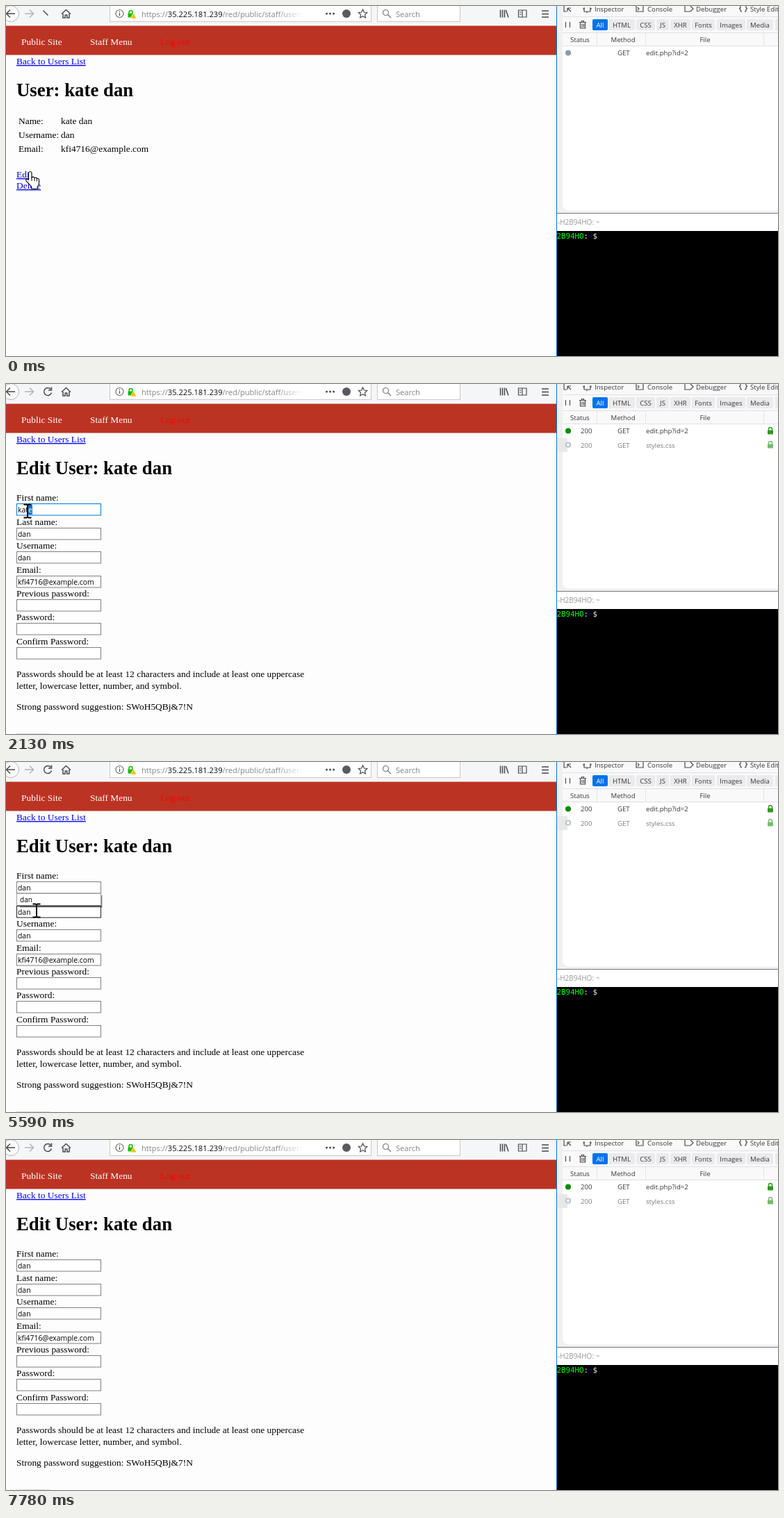
These frames come from a looping animation (1111x504 px, 8 s). An HTML page:

```html
<!DOCTYPE html>
<html lang="en">
<head>
<meta charset="utf-8">
<title>Edit user</title>
<style>
html, body { margin: 0; width: 100%; height: 100%; overflow: hidden; background: #fdfdfd; }
svg { display: block; width: 1111px; height: 504px; }
text { white-space: pre; }
.page { font: 13.44px "Liberation Serif", serif; }
.h1 { font: bold 26.8px "Liberation Serif", serif; }
.link { font: 13.44px "Liberation Serif", serif; fill: #0000ee; text-decoration: underline; }
.ui { font: 10.4px "Open Sans", sans-serif; }
.url { font: 11.1px "Open Sans", sans-serif; fill: #858585; }
.dev { font: 9.65px "Open Sans", sans-serif; fill: #38383d; }
.term { font: 10.8px "DejaVu Sans Mono", monospace; }
.mid { text-anchor: middle; }
.icon { fill: none; stroke: #4a4a4f; stroke-width: 1.5; }
.thin { stroke-width: 1.2; }
rect { shape-rendering: crispEdges; }
.soft { shape-rendering: auto; }
</style>
</head>
<body>
<svg id="stage" viewBox="0 0 1111 504"></svg>
<script>
const FIRST = 'kate', LAST = 'dan', MAIL = 'kfi4716@example.com';

const text = (x, y, s, cls, extra = '') => `<text x="${x}" y="${y}" class="${cls}" ${extra}>${s}</text>`;
const rect = (x, y, w, h, fill, extra = '') => `<rect x="${x}" y="${y}" width="${w}" height="${h}" fill="${fill}" ${extra}/>`;
const icon = (d, cls = '', style = '') => `<path class="icon ${cls}" d="${d}" style="${style}"/>`;
const dot = (x, y, r, fill, extra = '') => `<circle cx="${x}" cy="${y}" r="${r}" fill="${fill}" ${extra}/>`;
const group = (id, body) => `<g id="${id}">${body}</g>`;
const lock = (x, y, color) =>
  rect(x - 4, y - 1, 8, 6, color, 'rx="1" class="soft"') +
  icon(`M${x - 2.5} ${y}v-2.5a2.5 2.5 0 0 1 5 0v2.5`, '', `stroke:${color}`);

function toolbar() {
  const box = 'stroke="#c8c8c8"';
  return rect(0, 0, 792, 29, '#f5f6f7') +
    dot(7, 11, 11.5, '#fbfbfb', 'stroke="#b5b5b5"') +
    icon('M13 11H1M6 5.5L.5 11L6 16.5') +
    icon('M27 11H39M34 5.5L39.5 11L34 16.5', '', 'stroke:#b4b4b6') +
    group('stop', icon('M53.5 6.5l7 7')) +
    group('reload', icon('M64.5 7.5a5.5 5.5 0 1 0 1 5M65.5 4.5v4.5h-4.5')) +
    icon('M80 11.5L86.5 5.5L93 11.5M82 11v6h3.2v-4h2.6v4h3.2v-6') +
    rect(149.5, -4.5, 376, 27, '#fff', box) + rect(534.5, -4.5, 119, 27, '#fff', box) +
    dot(163.5, 11, 5.5, 'none', 'stroke="#6b6b6b" stroke-width="1.2"') +
    icon('M163.5 10v4M163.5 7.5v1.5', 'thin') +
    lock(179.5, 11.5, '#12bc00') +
    '<path d="M183.5 10l4.5 8h-9z" fill="#ffbf00" stroke="#fff" stroke-width=".7"/>' +
    text(195, 16, 'https://<tspan fill="#0c0c0d">35.225.181.239</tspan>/red/public/staff/users', 'url') +
    rect(390, 2, 38, 19, 'url(#fade)') + rect(428, 2, 26, 19, '#fff') +
    [461.5, 466.5, 471.5].map(x => dot(x, 11, 1.5, '#4a4a4f')).join('') +
    dot(490, 11, 6, '#5a5a5f') +
    icon('M513.5 5l1.9 4 4.3.5-3.2 3 .9 4.4-3.9-2.2-3.9 2.2.9-4.4-3.2-3 4.3-.5z', 'thin') +
    icon('M549.5 12.5l4.5 4.5M550.5 9.5a4 4 0 1 1-8 0a4 4 0 1 1 8 0', 'thin', 'stroke:#777') +
    text(561, 16, 'Search', 'url') +
    icon('M711.5 5.5v11M714.5 5.5v11M717.5 5.5v11M719.5 6l3.5 10.5') +
    icon('M737.5 6h11.5v10h-11.5zM743 6v10M739 9h2.5M739 12h2.5', 'thin') +
    icon('M771 7h10M771 11.5h10M771 16h10');
}

function nav() {
  return rect(0, 28.5, 792, 42, '#bb3323', 'class="soft"') +
    text(22, 56, 'Public Site', 'page', 'fill="#fff"') +
    text(121, 56, 'Staff Menu', 'page', 'fill="#fff"') +
    text(222, 56, 'Log out', 'page', 'fill="#f00"') +
    text(15, 84, 'Back to Users List', 'link');
}

function viewPage() {
  const rows = [['Name:', `${FIRST} ${LAST}`], ['Username:', LAST], ['Email:', MAIL]];
  return text(15, 130, `User: ${FIRST} ${LAST}`, 'h1') +
    rows.map(([k, v], i) => text(18, 170 + 20 * i, k, 'page') + text(79, 170 + 20 * i, v, 'page')).join('') +
    text(15, 247, 'Edit', 'link') + text(15, 263, 'Delete', 'link');
}

function editPage() {
  const fields = [['First name:', FIRST], ['Last name:', LAST], ['Username:', LAST], ['Email:', MAIL],
    ['Previous password:', ''], ['Password:', ''], ['Confirm Password:', '']];
  return text(15, 130, `Edit User: ${FIRST} ${LAST}`, 'h1') +
    fields.map(([label, value], i) => {
      const top = Math.round(172.3 + 34.4 * i);
      return text(15, top - 4, label, 'page') +
        rect(15.5, top + .5, 121, 16.5, '#fff', `id="box${i}" class="soft" stroke="#7f7f7f"`) +
        text(17, top + 13, value, 'ui', `id="val${i}"`);
    }).join('') +
    rect(17, 174, 21, 14, '#0078d7', 'id="sel"') +
    text(17, 185, FIRST, 'ui', 'fill="#fff" clip-path="url(#selClip)"') +
    rect(38, 175, 1, 13, '#000', 'id="caret"') +
    group('popup', rect(20, 192, 119, 18, '#000', 'opacity=".22"') + rect(20, 192, 118, 17, '#000', 'opacity=".3"') +
      rect(15.5, 189.5, 121, 17, '#fff', 'stroke="#a0a0a0"') + text(20, 202, LAST, 'ui', 'style="font-size:10px"')) +
    text(15, 422, 'Passwords should be at least 12 characters and include at least one uppercase', 'page') +
    text(15, 439, 'letter, lowercase letter, number, and symbol.', 'page') +
    text(15, 469, 'Strong password suggestion: SWoH5QBj&amp;7!N', 'page') +
    rect(15, 503, 49, 1, '#dcdcdc');
}

function devtools() {
  const tabs = [[847, 'Inspector'], [923, 'Console'], [993, 'Debugger'], [1071, 'Style Editor']];
  const filters = [[867, 38, 'HTML'], [907, 27, 'CSS'], [936, 18, 'JS'], [956, 29, 'XHR'],
    [987, 33, 'Fonts'], [1023, 41, 'Images'], [1066, 38, 'Media'], [1107, 10, '']];
  const row = (y, name) => text(880, y, 'GET', 'dev') + text(921, y, name, 'dev');
  return rect(793, 0, 318, 298, '#f0f0f0') +
    '<path d="M801 0H1111V294.500H811Q801 294.500 801 285z" fill="#fff"/>' +
    rect(801, 0, 310, 57, '#f9f9fa') +
    [15, 38, 57].map(y => rect(801, y, 310, 1, '#e0e0e2')).join('') +
    [850, 920, 1090].map(x => rect(x, 39, 1, 18, '#e4e4e6')).join('') +
    icon('M803 -1v9h4M808 3l5 5M808 3v5M808 3h5', 'thin') +
    icon('M832 2v6h9v-6M836 8v2M830 4h3M840 4h3', 'thin') +
    icon('M907 -1v9h10v-9M909 2l2 2-2 2', 'thin') +
    icon('M977 0v8h8l4-4-4-4', 'thin') +
    icon('M1059 -1q-2 0-2 2v1l-1.5 1.5 1.5 1.5v1q0 2 2 2M1063 -1q2 0 2 2v1l1.5 1.5-1.5 1.5v1q0 2-2 2', 'thin') +
    tabs.map(([x, s]) => text(x, 8, s, 'dev')).join('') +
    rect(805, 23, 1, 8, '#38383d') + rect(811, 23, 1, 8, '#38383d') +
    icon('M825 23.5h10M828.5 23v-1.5h3v1.5M826.5 24v8h7v-8M829 25.5v5M831.5 25.5v5', 'thin') +
    rect(844, 19, 22, 16, '#0074e8', 'rx="2" class="soft"') + text(855, 30.5, 'All', 'dev mid', 'style="fill:#fff"') +
    filters.map(([x, w, s]) => rect(x, 19, w, 16, '#ebebed', 'rx="2" class="soft"') +
      text(x + w / 2, 30.5, s, 'dev mid')).join('') +
    text(812, 52, 'Status', 'dev') + text(888, 52, 'Method', 'dev mid') + text(1006, 52, 'File', 'dev mid') +
    row(71, 'edit.php?id=2') +
    dot(809, 67.5, 4, '#8b9aa8', 'id="state"') +
    group('done', text(827, 71, '200', 'dev') + lock(1100, 67.5, '#2e9a1e')) +
    group('css', rect(793, 78, 15, 20, '#e8e8e8') + '<g opacity=".65">' + row(92, 'styles.css') +
      text(827, 92, '200', 'dev') + lock(1100, 87.5, '#2e9a1e') + '</g>' +
      dot(809, 87.5, 3.2, '#fff', 'stroke="#b4c0cc" stroke-width="1.8"'));
}

function terminal() {
  return rect(793, 298, 318, 1, '#777') + rect(793, 299, 318, 25, '#fff') +
    text(794, 314.5, '-H2B94HO: ~', 'ui', 'fill="#999" style="font-size:10px"') +
    rect(793, 324, 318, 180, '#000') +
    text(792.5, 335, '<tspan fill="#0f0">2B94HO</tspan>:<tspan fill="#0000d8">~</tspan>$', 'term', 'fill="#f2f2f2"') +
    rect(792, 0, 1, 504, '#0078d7');
}

const pointers =
  group('hand', '<path d="M-2.5-9q2.5-3 4.5 0v7q2.500-2 4 .5 2.5-1.5 3.5 1 2.5-1 3 1.5v5q0 3-2 5v3h-9v-3l-6-6.5q-4-4 0-4.5l2 1.5z" ' +
    'fill="#fff" stroke="#000" stroke-width="1.1"/><path d="M2-2v5M6-1v4M9.5 0v3.5" stroke="#000"/>') +
  group('beam', '<path d="M-5.5-9.5h4l1.5 1 1.5-1h4M0-9v18.5M-5.5 9.5h4l1.5-1 1.5 1h4" fill="none" stroke="#000" stroke-width="1.9"/>') +
  group('arrow', '<path d="M.5.5v19l4.5-4.3 3.2 7.3 3.2-1.4-3.2-7h6z" fill="#fff" stroke="#000"/>');

document.getElementById('stage').innerHTML = `<defs>
  <linearGradient id="fade"><stop offset="0" stop-color="#fff" stop-opacity="0"/><stop offset="1" stop-color="#fff"/></linearGradient>
  <clipPath id="selClip"><rect id="selArea" x="17" y="174" width="21" height="14"/></clipPath></defs>` +
  rect(0, 0, 1111, 504, '#fdfdfd') + toolbar() + nav() + group('view', viewPage()) + group('edit', editPage()) +
  devtools() + terminal() + group('pointer', pointers);

const $ = id => document.getElementById(id);
const show = (id, on) => $(id).setAttribute('visibility', on ? 'inherit' : 'hidden');
const last = (list, t) => list.findLast(k => k[0] <= t);

// Pointer as captured: time, x, y, shape
const moves = [
  [0, 35, 249, 'hand'], [550, 35, 258, 'beam'], [700, 35, 270, 'beam'], [840, 34, 286, 'beam'], [980, 32, 291, 'beam'],
  [1280, 27, 179, 'beam'], [1710, 34, 182, 'beam'], [1850, 41, 184, 'beam'], [2130, 31, 183, 'beam'],
  [2270, 21, 181, 'beam'], [2410, 12, 180, 'beam'], [2550, 7, 179, 'beam'], [2810, 12, 180, 'beam'],
  [3080, 19, 181, 'beam'], [3220, 27, 183, 'beam'], [3350, 32, 184, 'beam'],
  [5160, 34, 189, 'beam'], [5300, 38, 198, 'beam'], [5430, 42, 209, 'beam'], [5590, 44, 214, 'beam'],
  [6290, 80, 226, 'arrow'], [6410, 150, 250, 'arrow'], [6550, 230, 274, 'arrow'], [6690, 278, 290, 'arrow'],
  [6840, 274, 305, 'arrow'], [6990, 270, 312, 'arrow'],
  [7400, 330, 350, 'arrow'], [7530, 410, 405, 'arrow'], [7650, 456, 440, 'arrow'], [7780, 456, 440, '']
];
const typed = [[0, FIRST], [4060, LAST.slice(0, 1)], [4200, LAST.slice(0, 2)], [4330, LAST]];
const borders = [
  [[0, '#7f7f7f'], [1280, '#0078d7'], [3080, '#222'], [5300, '#7f7f7f']],
  [[0, '#7f7f7f'], [5430, '#222'], [6290, '#7f7f7f']]
];
const carets = [[0, 0], [1280, 38], [2130, 0], [4060, 22], [4200, 28], [4330, 0], [4890, 34], [5430, 0],
  [5960, 34], [6480, 0], [6990, 34], [7530, 0]];

function draw(t) {
  const [, x, y, shape] = last(moves, t);
  $('pointer').setAttribute('transform', `translate(${x} ${y})`);
  for (const id of ['hand', 'beam', 'arrow']) show(id, id === shape);

  const loaded = t >= 270;
  show('view', !loaded);
  show('edit', loaded);
  show('stop', !loaded);
  show('reload', loaded);
  show('done', t >= 130);
  show('css', t >= 410);
  $('state').setAttribute('fill', t < 130 ? '#8b9aa8' : '#058b00');

  borders.forEach((list, i) => $('box' + i).setAttribute('stroke', last(list, t)[1]));
  $('val0').textContent = last(typed, t)[1];
  show('popup', t >= 4060 && t < 5860);

  const caret = last(carets, t)[1];
  show('caret', loaded && caret > 0);
  $('caret').setAttribute('x', caret);

  const from = t < 2130 || t >= 4060 ? 38 : t < 2270 ? 31 : t < 2410 ? 23 : 17;
  for (const id of ['sel', 'selArea']) {
    $(id).setAttribute('x', from);
    $(id).setAttribute('width', 38 - from);
  }
}

function tick() {
  draw(performance.now() % 8000);
  requestAnimationFrame(tick);
}
tick();
</script>
</body>
</html>
```
